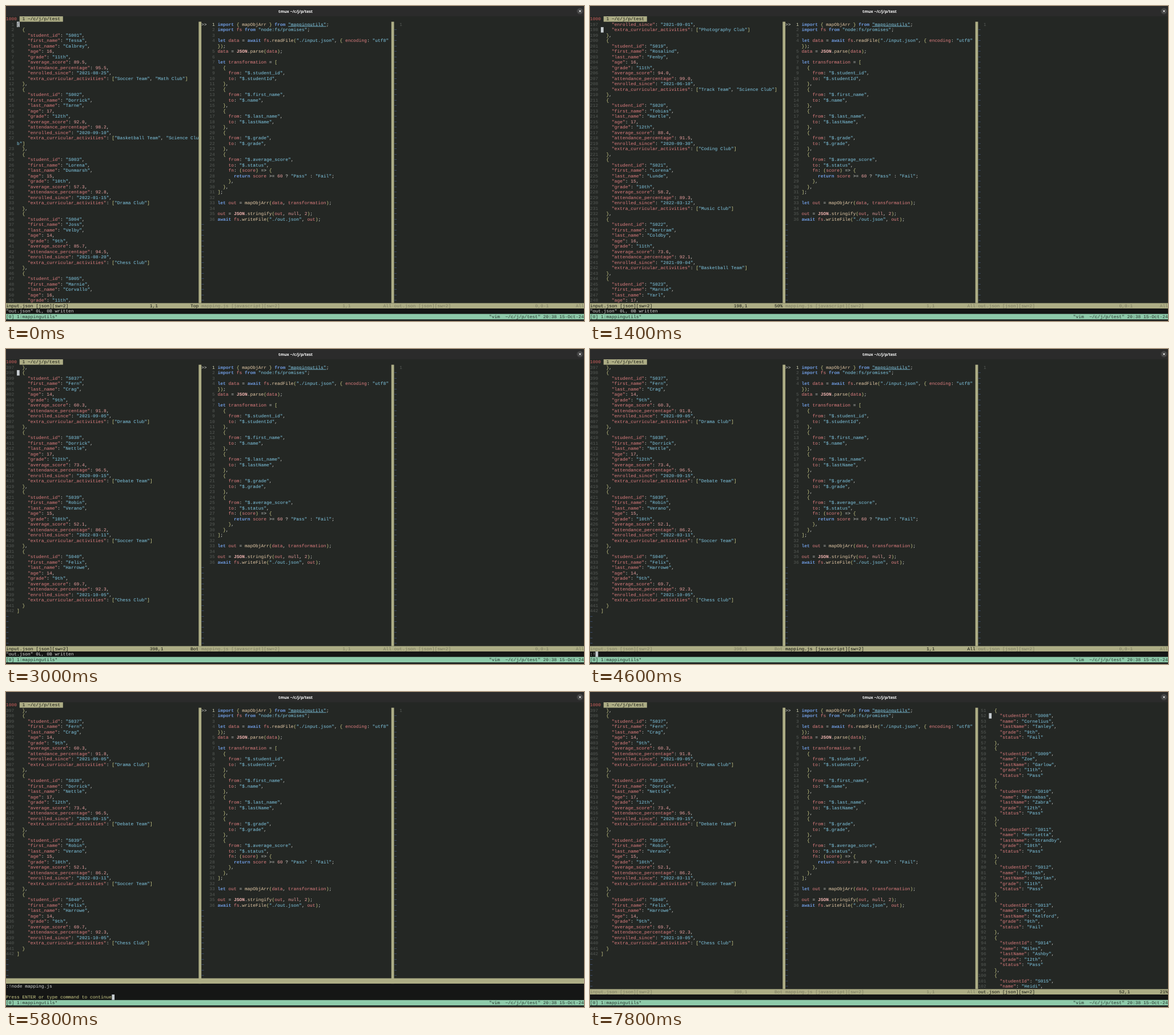
Write an HTML page that moves like this. It is 1012 px wide and 553 px high and loops after 8 s.

```html
<!DOCTYPE html>
<html lang="en">
<head>
<meta charset="utf-8">
<title>Terminal session</title>
<style>
  html, body { margin: 0; width: 100%; height: 100%; overflow: hidden; background: #242724; }
  svg { display: block; width: 100vw; height: 100vh; }
  text {
    font: 7.917px "Liberation Mono", "DejaVu Sans Mono", monospace;
    text-rendering: geometricPrecision; fill: #d8dad6;
  }
  .title { font: bold 7px "Open Sans", "Noto Sans", sans-serif; fill: #fff; }
  .key, .name { fill: #e07f80; }
  .str, .lint { fill: #82cae6; }
  .lint { text-decoration: underline; }
  .num { fill: #eaa0a0; }
  .brace { fill: #d2d28c; }
  .word { fill: #6f9be0; font-weight: bold; }
  .type { fill: #f0b4b0; font-weight: bold; }
  .call { fill: #e6cba8; }
  .nr { fill: #555955; }
  .nrOn { fill: #d5d5b5; }
  .tilde { fill: #4f6ba3; }
  .tab { fill: #d0605f; }
  .on { fill: #10120e; }
  .off { fill: #7d7d62; }
  .ask { fill: #d0d08a; }
  .bar { fill: #27352d; }
</style>
</head>
<body>
<svg id="stage" viewBox="0 0 1012 553" preserveAspectRatio="none" xml:space="preserve"></svg>
<script>
const COLS = 213, CW = 1012 / COLS, RH = 9.5, TOP = 18.1;
const PANE_ROWS = 52, STATUS_ROW = 53, CMD_ROW = 54, LOOP = 8000;
const BG = '#242724', DARK = '#151615', OLIVE = '#adad85', GREEN = '#8ecaaa', CURSOR = '#c6ccd0';

// first, last, age, score, attendance, enrolled, clubs; "-" or nothing is filled in by rule
const ROSTER = `Tessa Calbrey 16 89.5 95.5 2021-08-25 Soccer Team/Math Club
Dorrick Tarne 17 92.0 98.2 2020-09-10 Basketball Team/Science Club
Lorena Dunmarsh 15 57.3 92.8 2022-01-15 Drama Club
Joss Velby 14 85.7 94.5 2021-08-20 Chess Club
Marnie Corvallo 16
Edgar Pembury 15 - - - Basketball Team/Science Club
Petra Oakley 17
Cornelius Tanley 14 54.6
Zoe Garlow 16
Barnabas Zabra 17
Henrietta Strandby 15 - - - Basketball Team/Science Club
Josiah Dorlan 16
Bettie Kelford 14 56.9
Miles Ashby 17
Heidi Lorring 15 - - - Basketball Team/Science Club
Conrad Medwin 16
Thea Rushby 14
Gideon Marlow 15 - - 2021-09-01 Photography Club
Rosalind Fenby 16 94.0 99.0 2021-06-10 Track Team/Science Club
Tobias Hartle 17 88.4 91.5 2020-09-30 Coding Club
Lorena Lunde 15 58.2 89.3 2022-03-12 Music Club
Bertram Coldby 16 73.6 92.1 2021-09-04 Basketball Team
Marnie Yarl 17
Casper Dunley 14
Freya Tolmore 16
Hugo Sandrel 15
Willa Crosbey 17 - - - Drama Club
Kurt Ambleton 15 64.8 94.2 2022-04-01 Robotics Club
Una Pell 16 57.5 90.6 2021-08-30 Chess Club
Cornelius Orrin 14 66.4 95.0 2021-09-02 Track Team
Tessa Wexham 15 78.5 93.2 2022-01-20 Math Club
Rupert Plumby 17
Greta Fallow 16
Simon Tarbeck 14
Nora Eldwin 15
Oscar Brindle 17
Fern Crag 14 60.3 91.8 2021-09-05 Drama Club
Dorrick Nettle 17 73.4 96.5 2020-09-15 Debate Team
Robin Verano 15 52.1 86.2 2022-03-11 Soccer Team
Felix Harrowe 14 69.7 92.3 2021-10-05 Chess Club`;
const CLUBS = ['Art Club', 'Music Club', 'Debate Team', 'Coding Club', 'Soccer Team'];

const noise = n => { const v = Math.sin(n * 12.9898) * 43758.5453; return v - Math.floor(v); };
const pad = (n, size) => String(n).padStart(size, '0');

const students = ROSTER.split('\n').map((row, i) => {
  const n = i + 1, [first, last, age, ...rest] = row.split(' ');
  const [score, attendance, since] = rest.map(v => v === '-' ? '' : v);
  const clubs = rest.slice(3).join(' ') || CLUBS[n % CLUBS.length];
  return {
    id: 'S' + pad(n, 3), first, last, age, grade: age - 5 + 'th',
    score: score || (61 + noise(n) * 36).toFixed(1),
    attendance: attendance || (87 + noise(n + 50) * 12).toFixed(1),
    since: since || `2021-${pad(6 + n % 4, 2)}-${pad(1 + Math.floor(noise(n + 90) * 28), 2)}`,
    clubs: '[' + clubs.split('/').map(c => `"${c}"`).join(', ') + ']'
  };
});

const toJson = fields => ['[', ...students.flatMap((s, i) => [
  '  {',
  ...fields(s).map(([key, value], k, all) => `    "${key}": ${value}${k < all.length - 1 ? ',' : ''}`),
  i < students.length - 1 ? '  },' : '  }'
]), ']'];
const quote = s => `"${s}"`;

const inputLines = toJson(s => [
  ['student_id', quote(s.id)], ['first_name', quote(s.first)], ['last_name', quote(s.last)],
  ['age', s.age], ['grade', quote(s.grade)], ['average_score', s.score],
  ['attendance_percentage', s.attendance], ['enrolled_since', quote(s.since)],
  ['extra_curricular_activities', s.clubs]
]);
const outLines = toJson(s => [
  ['studentId', quote(s.id)], ['name', quote(s.first)], ['lastName', quote(s.last)],
  ['grade', quote(s.grade)], ['status', quote(s.score >= 60 ? 'Pass' : 'Fail')]
]);
const mapping = [['student_id', 'studentId'], ['first_name', 'name'], ['last_name', 'lastName'],
  ['grade', 'grade'], ['average_score', 'status']];
const scriptLines = [
  'import { mapObjArr } from "mappingutils";',
  'import fs from "node:fs/promises";',
  '',
  'let data = await fs.readFile("./input.json", { encoding: "utf8" });',
  'data = JSON.parse(data);',
  '',
  'let transformation = [',
  ...mapping.flatMap(([from, to]) => [
    '  {', `    from: "$.${from}",`, `    to: "$.${to}",`,
    ...(to === 'status' ? ['    fn: (score) => {', '      return score >= 60 ? "Pass" : "Fail";', '    },'] : []),
    '  },'
  ]),
  '];',
  '',
  'let out = mapObjArr(data, transformation);',
  '',
  'out = JSON.stringify(out, null, 2);',
  'await fs.writeFile("./out.json", out);'
];

const JSON_RULES = /(?<key>"[^"]*"(?=:))|(?<str>"[^"]*")|(?<num>[\d.]+)|(?<brace>[{}[\]])|(?<plain>[^"\d{}[\]]+)/g;
const JS_RULES = new RegExp([
  '(?<lint>"mappingutils")', '(?<str>"[^"]*")', '(?<key>\\w+(?=:))',
  '(?<word>\\b(?:import|from|let|await|return)\\b)', '(?<type>\\bJSON\\b)', '(?<call>mapObjArr|\\w+(?=\\())',
  '(?<num>\\d+|null)', '(?<name>\\w+)', '(?<brace>[{}()[\\]])', '(?<plain>[^\\w"{}()[\\]]+)'
].join('|'), 'g');

const tokens = (line, rules) => [...line.matchAll(rules)].map(m =>
  [m[0], Object.keys(m.groups).find(k => m.groups[k] !== undefined)]);

const escape = s => s.replace(/&/g, '&amp;').replace(/</g, '&lt;').replace(/>/g, '&gt;');
const rowY = row => TOP + row * RH;
const put = (col, row, str, cls = 'plain') => {
  const trimmed = str.trimStart(), x = (col + str.length - trimmed.length) * CW;
  return trimmed && `<text x="${x.toFixed(2)}" y="${(rowY(row) + 6.9).toFixed(2)}" class="${cls}" xml:space="preserve">${escape(trimmed)}</text>`;
};
const block = (col, row, cols, rows, fill) =>
  `<rect x="${(col * CW).toFixed(2)}" y="${rowY(row).toFixed(2)}" width="${(cols * CW).toFixed(2)}" height="${(rows * RH).toFixed(2)}" fill="${fill}"/>`;
const cursorAt = (col, row, under = '') => block(col, row, 1, 1, CURSOR) + put(col, row, under, 'on');

const PANES = [
  { col: 0, end: 71, gutter: 4, rules: JSON_RULES, label: 'input.json [json][sw=2]' },
  { col: 72, end: 142, gutter: 6, rules: JS_RULES, label: 'mapping.js [javascript][sw=2]' },
  { col: 143, end: 213, gutter: 4, rules: JSON_RULES, label: 'out.json [json][sw=2]' }
];

function place(top, bottom, total) {
  if (top === 1) return bottom === total ? 'All' : 'Top';
  if (bottom === total) return 'Bot';
  return Math.floor(100 * (top - 1) / (top - 1 + total - bottom)) + '%';
}

function drawPane(pane, lines, top, active, showCursor) {
  const left = pane.col + pane.gutter, width = pane.end - left;
  let svg = '', row = 1, n = top;
  for (; n <= lines.length; n++) {
    const line = lines[n - 1], height = Math.max(1, Math.ceil(line.length / width));
    if (row + height > PANE_ROWS + 1) break;
    const marked = pane.gutter === 6 && n === 1;
    if (marked) svg += put(pane.col, row, '>>');
    svg += put(left - 4, row, String(n).padStart(3), marked ? 'nrOn' : 'nr');
    let at = 0;
    for (let [str, cls] of tokens(line, pane.rules)) {
      while (str) {
        const part = str.slice(0, width - at % width);
        svg += put(left + at % width, row + Math.floor(at / width), part, cls);
        at += part.length;
        str = str.slice(part.length);
      }
    }
    row += height;
  }
  const bottom = n - 1, cursorRow = top > 1 ? 2 : 1;
  for (; row <= PANE_ROWS; row++) svg += put(pane.col, row, '~', 'tilde');
  if (showCursor) svg += cursorAt(left, cursorRow, lines[top + cursorRow - 2][0]);

  const cls = active ? 'on' : 'off';
  const ruler = lines[0] ? `${top + cursorRow - 1},1` : '0,0-1';
  return svg + put(pane.col, STATUS_ROW, pane.label, cls)
    + put(pane.end - 18, STATUS_ROW, ruler, cls)
    + put(pane.end - 3, STATUS_ROW, place(top, bottom, lines.length), cls);
}

const FRAME = `<rect width="1012" height="553" fill="${BG}"/>
  <rect width="1012" height="${TOP}" fill="#2b2b2b"/>
  <text class="title" x="507" y="11.6" text-anchor="middle">tmux ~/c/j/p/test</text>
  <circle cx="1005" cy="9" r="5.6" fill="#444"/>
  <path d="M1003.2 7.2l3.6 3.6m0-3.6l-3.6 3.6" stroke="#fff" stroke-width="1"/>`
  + put(0, 0, '1000', 'tab') + block(5, 0, 16, 1, OLIVE) + put(6, 0, '1 ~/c/j/p/test', 'on')
  + block(71, 1, 1, PANE_ROWS, OLIVE) + block(142, 1, 1, PANE_ROWS, OLIVE)
  + block(0, STATUS_ROW, COLS, 1, OLIVE) + block(0, CMD_ROW, COLS, 1, DARK)
  + block(0, 55, COLS, 1, GREEN) + put(0, 55, '[0] 1:mappingutils*', 'bar')
  + put(178, 55, '"vim  ~/c/j/p/test" 20:38 15-Oct-24', 'bar');

const STEPS = [
  [0, { top: 1, outTop: 1, focus: 0, keys: '', message: '"out.json" 0L, 0B written', typing: false, prompt: false, done: false }],
  [400, { top: 50 }],
  [700, { keys: '^F' }],
  [800, { top: 99, keys: '' }],
  [1100, { top: 148 }],
  [1400, { top: 197 }],
  [1800, { top: 247 }],
  [2100, { keys: '^F' }],
  [2200, { top: 297, keys: '' }],
  [2500, { keys: '^F' }],
  [2600, { top: 347, keys: '' }],
  [3000, { top: 397 }],
  [3700, { keys: '^W' }],
  [4000, { focus: 1, keys: '' }],
  [4400, { message: ':', typing: true }],
  [4600, { message: ':!' }],
  [4800, { message: ':!no' }],
  [5000, { message: ':!node %' }],
  [5600, { message: ':!node mapping.js' }],
  [5700, { prompt: true }],
  [6300, { message: '', typing: false, prompt: false, done: true }],
  [6700, { keys: '^W' }],
  [6900, { focus: 2, keys: '' }],
  [7700, { outTop: 51 }]
];
let merged = {};
const states = STEPS.map(([at, change]) => (merged = { ...merged, ...change, at }));

function draw(s) {
  const views = [[inputLines, s.top], [scriptLines, 1], [s.done ? outLines : [''], s.outTop]];
  let svg = FRAME + PANES.map((pane, i) =>
    drawPane(pane, ...views[i], i === s.focus, i === s.focus && !s.typing)).join('');
  if (s.prompt) {
    const ask = 'Press ENTER or type command to continue';
    svg += block(0, 51, COLS, 1, OLIVE) + block(0, 52, COLS, 3, DARK)
      + put(0, 52, s.message) + put(0, CMD_ROW, ask, 'ask') + cursorAt(ask.length, CMD_ROW);
  } else {
    svg += put(0, CMD_ROW, s.message) + put(202, CMD_ROW, s.keys);
    if (s.typing) svg += cursorAt(s.message.length, CMD_ROW);
  }
  return svg;
}

const stage = document.getElementById('stage');
const start = performance.now();
let shown;
function tick() {
  const t = (performance.now() - start) % LOOP;
  const state = states.findLast(s => s.at <= t);
  if (state !== shown) stage.innerHTML = draw(shown = state);
  requestAnimationFrame(tick);
}
tick();
</script>
</body>
</html>
```
